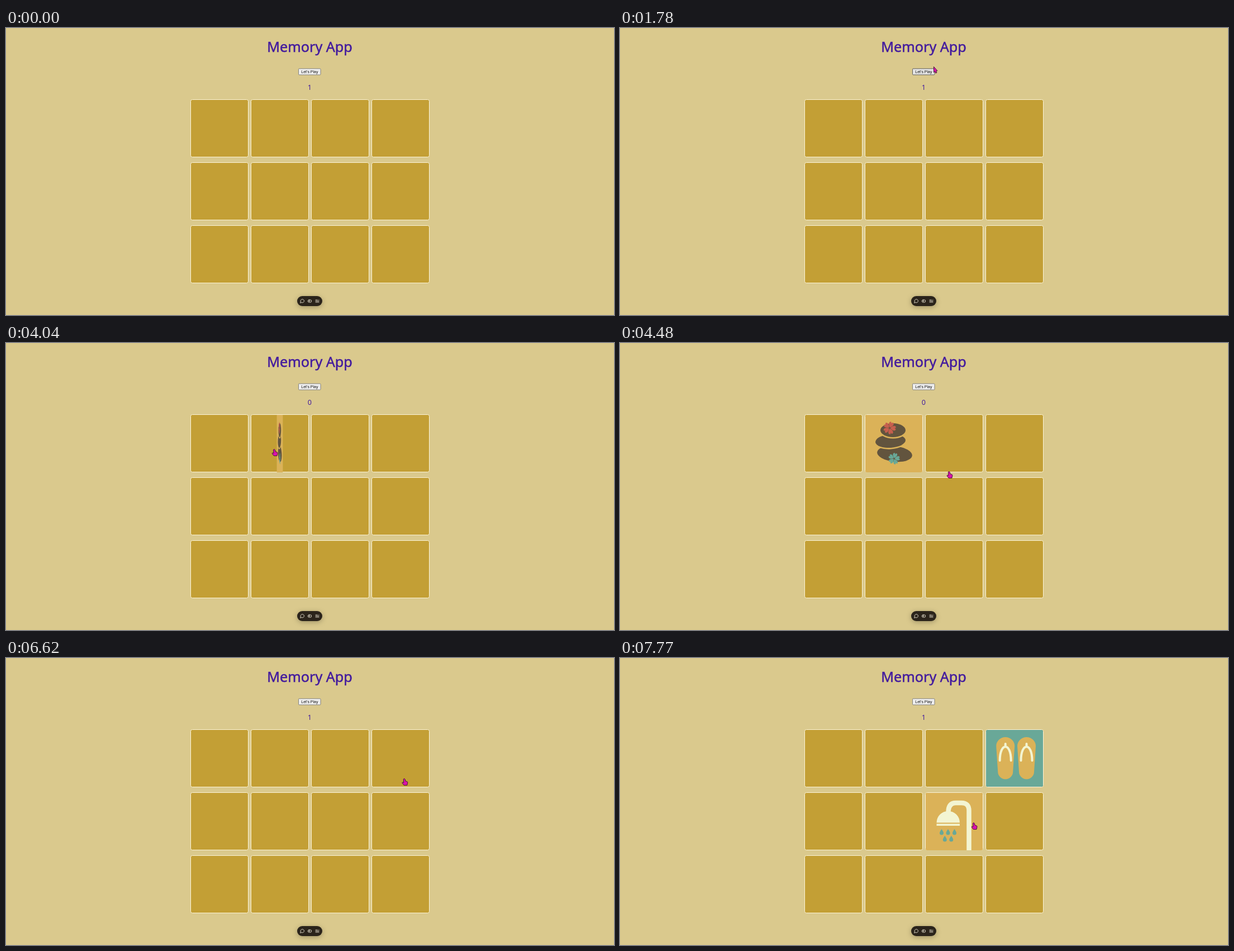
An HTML page that plays this animation: 1088x515 px, repeating every 7990 ms.

```html
<!DOCTYPE html>
<html lang="en">
<head>
<meta charset="utf-8">
<title>Memory App</title>
<style>
  html, body { margin: 0; height: 100%; overflow: hidden; background: #dac98d; }
  svg { display: block; width: 1088px; height: 515px; }
  text { text-anchor: middle; fill: #431b9e; font-family: "Noto Sans", "Open Sans", sans-serif; }
  .title { font-size: 25.2px; stroke: #431b9e; stroke-width: .5px; }
  .label { font: 7px "Liberation Sans", Arial, sans-serif; fill: #111; }
  .stroke { fill: none; stroke-linecap: round; stroke-linejoin: round; }
  .bar { filter: drop-shadow(0 2px 5px #0004); }
  .cursor { fill: #dc12ac; stroke: #3b1233; stroke-width: .9; stroke-linejoin: round; }
</style>
</head>
<body>
<svg viewBox="0 0 1088 515">
  <defs>
    <path id="petal" d="M0-1C-6-6-4-11-1-10L0-8 1-10C4-11 6-6 0-1Z"/>
    <g id="flower"></g>
    <path id="drop" d="M0-5Q3.500 0 3.500 2A3.500 3.500 0 0 1-3.500 2Q-3.500 0 0-5Z"/>
    <g id="sandal">
      <path fill="#dbb258" d="M-16.500 158A16.500 16 0 0 1 16.500 158L13.500 204A13.500 13.500 0 0 1-13.500 204Z"/>
      <path class="stroke" stroke="#f3f5d2" stroke-width="4" d="M0 154V159M-10 184C-10 151 10 151 10 184"/>
    </g>
  </defs>

  <text class="title" x="543.5" y="43">Memory App</text>
  <rect id="button" x="523.5" y="73" width="39.5" height="11" rx="1.3" stroke-width=".9"/>
  <text class="label" x="543.4" y="81">Let's Play</text>
  <text id="score" x="543.4" y="111.3" font-size="12.6"></text>
  <g id="tiles" fill="#c39f35" stroke="#fbf2d4"></g>

  <g id="stones">
    <rect x="439" y="129" width="102" height="103" rx="2.5" fill="#dbb258"/>
    <g fill="#62543e" stroke="#dbb258" stroke-width="5" paint-order="stroke">
      <ellipse cx="491.5" cy="199" rx="31.5" ry="14" transform="rotate(6 491.5 199)"/>
      <ellipse cx="484" cy="176" rx="27" ry="12" transform="rotate(-4 484 176)"/>
      <ellipse cx="488.5" cy="156.5" rx="22.5" ry="12.5"/>
    </g>
    <use href="#flower" transform="translate(482.5 152.5) rotate(22) scale(1.1)" fill="#c65f4e"/>
    <use href="#flower" transform="translate(490.5 207.5) rotate(14)" fill="#68a897"/>
  </g>

  <g id="tea">
    <rect x="547" y="129" width="102" height="103" rx="2.5" fill="#8aa852"/>
    <g fill="#e2e5bb">
      <circle cx="585" cy="155" r="3"/>
      <path d="M570 167Q571 158 585 158T600 167Z"/>
      <path d="M571 168H600C608 174 609 186 602 193L595 198V200H575V198C561 192 560 176 571 168Z"/>
      <path d="M600 192C611 190 606 177 613 170H608C601 173 605 178 599 182Z"/>
      <path class="stroke" stroke="#eef1d0" stroke-width="3.5" d="M569 172C560 166 555 173 557 181S563 189 567 190"/>
      <path d="M613 198H636Q636 208 630 213H620Q613 208 613 198ZM619 214.500H633Q626 220 619 214.500Z"/>
      <path class="stroke" stroke="#e2e5bb" stroke-width="1.8" d="M636 200C642 198 642 206 634 208"/>
      <path id="steam" fill="#f1f3d4" d="M620 177C626 183 618 187 623 195C614 189 621 184 620 177Z"/>
      <use href="#steam" x="5"/>
    </g>
    <use href="#flower" transform="translate(621 160.5) rotate(14) scale(.92)" fill="#d9ae55"/>
  </g>

  <g id="sandals">
    <rect x="655" y="129" width="102" height="102" rx="2.5" fill="#69a898"/>
    <use href="#sandal" x="689.7"/>
    <use href="#sandal" x="727.5"/>
  </g>

  <g id="shower">
    <rect x="547" y="242" width="102" height="103" rx="2.5" fill="#dbb258"/>
    <path fill="none" stroke="#f3f5d2" stroke-width="8.5" d="M624.500 345V274Q624.500 260 611 260H601Q587.500 260 587.500 277"/>
    <path fill="#f3f5d2" d="M566.500 295.500A20.500 20.500 0 0 1 608 295.500ZM566.500 297.500H608V301H566.500Z"/>
    <g id="drops" fill="#68a897"></g>
  </g>

  <g class="bar">
    <rect x="521" y="481" width="45" height="18" rx="9" fill="#2b241b"/>
    <g class="stroke" stroke="#e9e3d2" stroke-width=".9">
      <path d="M526.800 493L527.300 491A3.200 3.100 0 1 1 529 492.700Z"/>
      <rect x="540.3" y="487.7" width="6.4" height="4.6" rx="2.3"/>
      <circle cx="542.8" cy="490" r=".8"/>
      <path d="M554 488H557.500M559.500 488H560M554 490H560M554 492H560"/>
    </g>
  </g>

  <g id="cursor" class="cursor">
    <path id="arrow" d="M.4.4L7 7.700 4.500 8 6 11 4 12 2.700 9 .5 10.700Z"/>
    <path id="hand" d="M-1.500 1.500Q0-.5 1.500 2L2 5 5 6Q6 6 6 8L5 12.500H-.6L-3.600 8.700Q-4 7-2.800 7L-1 8Z"/>
  </g>
</svg>
<script>
const LOOP = 7990, FLIP = 200, TILE = 104;
const $ = id => document.getElementById(id);
const range = n => [...Array(n).keys()];
const between = (v, a, b) => v >= a && v < b;
const tileX = i => 330 + 108 * (i % 4);
const tileY = i => 128 + 113 * Math.floor(i / 4);

// Pointer sweeps along curves: start, end, bend point, resting point
const origin = [932, 183];
const sweeps = [
  [310, 770, [570, 240], [582, 15]],
  [960, 1540, [650, -80], [561, 69]],
  [1800, 2460, [566, 104], [556, 78]],
  [2910, 3080, [640, 130], [698, 185]],
  [3080, 3580, [496, 284], [480, 190]],
  [4200, 4720, [616, 261], [621.5, 206]],
  [5880, 6130, [670, 200], [713, 206]],
  [6560, 7280, [715, 265], [633, 295]]
];

const cards = [
  { id: 'stones', tile: 1, click: 3800, close: 5900 },
  { id: 'tea', tile: 2, click: 4920, close: 5900 },
  { id: 'sandals', tile: 3, click: 6415, close: LOOP },
  { id: 'shower', tile: 6, click: 7370, close: LOOP }
];

$('flower').innerHTML = range(5).map(i => `<use href="#petal" transform="rotate(${72 * i})"/>`).join('');
$('drops').innerHTML = range(5).map(i => {
  const row = Math.floor(i / 3);
  return `<use href="#drop" x="${575.5 + 11.5 * (i % 3) + 5.75 * row}" y="${312 + 12 * row}"/>`;
}).join('');
$('tiles').innerHTML = range(12).map(i =>
  `<rect x="${tileX(i) + .5}" y="${tileY(i) + .5}" width="${TILE - 1}" height="${TILE - 1}" rx="3"/>`).join('');

const clamp = v => Math.min(1, Math.max(0, v));
const easeIn = v => clamp(v) ** 1.7;

function pointerAt(t) {
  let spot = origin;
  for (const [start, end, bend, rest] of sweeps) {
    const k = clamp((t - start) / (end - start));
    spot = spot.map((p, i) => (1 - k) ** 2 * p + 2 * k * (1 - k) * bend[i] + k * k * rest[i]);
  }
  return spot;
}

function drawPointer(t) {
  const [x, y] = t < sweeps[0][0] ? [-50, -50] : pointerAt(t);
  const onTile = range(12).some(i =>
    between(x - tileX(i), 0, TILE) && between(y - tileY(i), 0, TILE));
  const onButton = between(x, 523, 563) && between(y, 67, 84);
  const pressed = between(t, 2640, 2740);
  $('cursor').setAttribute('transform', `translate(${x} ${y})`);
  $('hand').style.display = onTile ? '' : 'none';
  $('arrow').style.display = onTile ? 'none' : '';
  $('button').setAttribute('fill', pressed ? '#f5f5f5' : onButton ? '#e5e5e5' : '#efefef');
  $('button').setAttribute('stroke', onButton && !pressed ? '#4f4f4f' : '#767676');
}

function drawCard({ id, tile, click, close }, t) {
  const open = easeIn((t - click - FLIP) / FLIP) - easeIn((t - close) / FLIP);
  const width = Math.sin(open * Math.PI / 2);
  const cx = tileX(tile) + TILE / 2;
  $(id).style.display = width > .005 ? '' : 'none';
  $(id).setAttribute('transform', `translate(${cx} 0) scale(${width} 1) translate(${-cx} 0)`);
}

function draw(now) {
  const t = now % LOOP;
  $('score').textContent = between(t, 2700, 5900) ? 0 : 1;
  cards.forEach(card => drawCard(card, t));
  drawPointer(t);
}

const begin = performance.now();
function tick() {
  draw(performance.now() - begin);
  requestAnimationFrame(tick);
}
tick();
</script>
</body>
</html>
```
